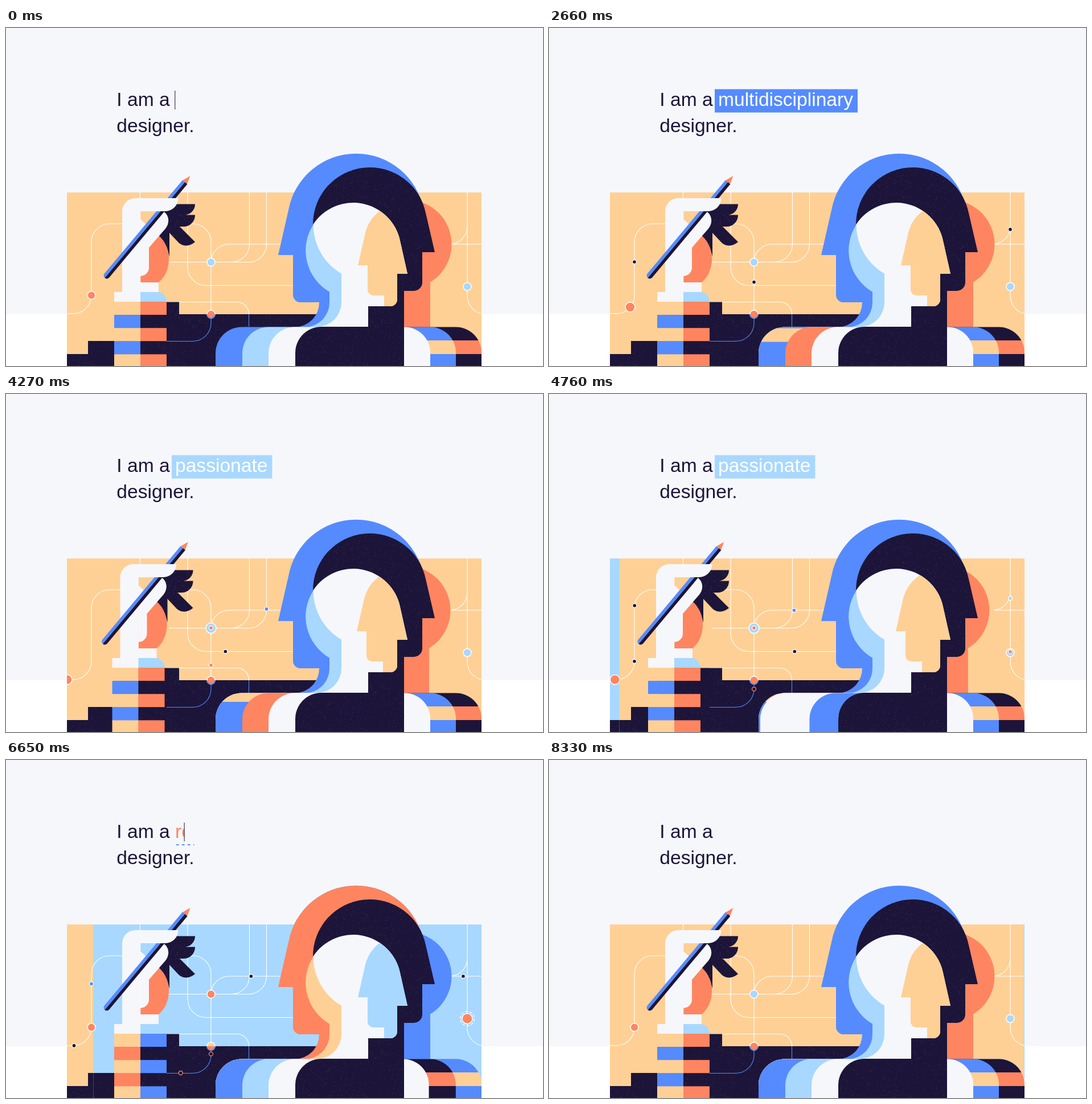
Write an HTML page that moves like this. It is 943 by 594 pixels and loops after 8.4 s.

```html
<!DOCTYPE html>
<html lang="en">
<head>
<meta charset="utf-8">
<title>I am a designer</title>
<style>
html, body { margin: 0; width: 100%; height: 100%; overflow: hidden; background: #f6f7fb; }
svg { display: block; width: 943px; height: 594px; }
text { font: 33.6px "Liberation Sans", Arial, sans-serif; white-space: pre; }
</style>
</head>
<body>
<svg id="stage" viewBox="0 0 943 594"></svg>
<script>
const LOOP = 8400;
const BLUE = '#558bff', SKY = '#a8d8ff', ORANGE = '#ff8560', PEACH = '#ffd095', NAVY = '#1c1539', PALE = '#f6f7fb';
const GRAIN = 'url(#grain)';
const WORD_X = 297;

const clamp = v => Math.max(0, Math.min(1, v));
const linear = v => v;
const smooth = v => v * v * (3 - 2 * v);
const cubicOut = v => 1 - (1 - v) ** 3;
const ramp = (t, start, length, ease = cubicOut) => ease(clamp((t - start) / length));

// Value at time t along [[time, value], ...]
function keyed(t, keys, ease = linear) {
  if (t <= keys[0][0]) return keys[0][1];
  for (let i = 1; i < keys.length; i++) {
    const [t0, v0] = keys[i - 1], [t1, v1] = keys[i];
    if (t <= t1) return v0 + (v1 - v0) * ease((t - t0) / (t1 - t0));
  }
  return keys[keys.length - 1][1];
}

const path = (d, fill, extra = '') => `<path d="${d}" fill="${fill}" ${extra}/>`;
const rect = (x, y, w, h, fill, extra = '') => `<rect x="${x}" y="${y}" width="${w}" height="${h}" fill="${fill}" ${extra}/>`;
const node = (x, y, fill, extra = '') =>
  `<circle cx="${x}" cy="${y}" r="7" fill="${fill}" stroke="#fff" stroke-width="1.5" ${extra}/>`;

function grainPattern(size, count) {
  let seed = 7, specks = '';
  const random = () => (seed = seed * 16807 % 2147483647) / 2147483647;
  for (let i = 0; i < count; i++) {
    specks += rect((random() * size).toFixed(1), (random() * size).toFixed(1), .8, .8, '#8a83a0', `opacity="${(.2 + random() * .4).toFixed(2)}"`);
  }
  return `<pattern id="grain" width="${size}" height="${size}" patternUnits="userSpaceOnUse">${rect(0, 0, size, size, NAVY)}${specks}</pattern>`;
}

const stripes = (id, base, row) =>
  `<pattern id="${id}" width="943" height="594" patternUnits="userSpaceOnUse">${rect(0, 0, 943, 594, base)}${rect(0, 549, 943, 24, row, `id="${id}Row"`)}</pattern>`;

const tracks = {
  left: 'M204 344H182A32 32 0 0 0 150 376V470A32 32 0 0 1 118 502H107',
  middle: 'M482 380H392A32 31 0 0 0 360 411V518A32 32 0 0 1 328 550H282',
  drop: 'M457.5 289V380H392A32 31 0 0 0 360 411',
  low: 'M282 481.5H405A21 21 0 0 1 426.500 502V525',
  cross: 'M319 289V420A32 32 0 0 0 351 452.500H505',
  right: 'M810 289V470A32 32 0 0 0 835 502',
  turn: 'M810 289V380H835',
  side: 'M835 380H782'
};

const lines = [
  tracks.left, tracks.cross, tracks.low, tracks.right, tracks.side,
  'M235.500 289V300', 'M286 344H328A32 32 0 0 1 360 376V503', 'M286 411.500H395',
  'M427.500 289V380A32 31.500 0 0 1 395 411.500', 'M457.500 289V380A32 31.500 0 0 1 426 411.500H395',
  'M482 380H392A32 31 0 0 0 360 411', 'M810 289V348A30 31 0 0 1 782 379.500'
].join('');

const HEAD = 'M539.500 345A84 84 0 0 1 692 374L705 432H687V477A12 12 0 0 1 675 489H636V525H546A43 43 0 0 0 589 482V431.600A100 100 0 0 1 539.500 345Z';

function woman(c) {
  const sleeves = [0, 1, 2, 3, 4].map(i => {
    const y = 481 + i * 23.1, odd = i % 2;
    return rect(190, y, 46.3, 23.6, odd ? c.hair : PEACH) + rect(236, y, 46, 23.6, odd ? GRAIN : c.back);
  }).join('');
  return `<g class="woman">
    ${path('M286 309.500H332A19 19 0 0 1 315 328.500H332A20 20 0 0 1 312 349H305L332 376C322 385 309 384 302 376L287 360V402C284 386 276 373 268 366L276 322Z', GRAIN)}
    ${path('M236 447H268C280 437 286 422 286 405C286 386 277 371 264 361L236 400Z', ORANGE)}
    ${path('M236 336L247 346L272 322H276C283 326 286 334 285 341C284 348 280 353 277 356L251 386V421A15 15 0 0 1 236 436Z', PALE)}
    ${path('M204 464V322H236.300V447H268V464H236.300V481.300H190V464Z', PALE)}
    ${path('M236 464H266A16 16 0 0 1 282 480V481.300H236Z', SKY)}
    ${sleeves}
    <g transform="translate(177 435) rotate(-50.1)">
      ${path('M214 -5.500H0A5.500 5.500 0 0 0 -5.500 0H214Z', BLUE)}
      ${path('M214 5.500H0A5.500 5.500 0 0 1 -5.500 0H214Z', NAVY)}
      ${path('M214 -5L228 0L214 5Z', ORANGE)}
    </g>
    ${path('M204 323V322A23 23 0 0 1 227 299H302.500A23 23 0 0 1 279.500 322H236V323Z', PALE)}
  </g>`;
}

function head(c) {
  return `<g class="face"><circle cx="704.5" cy="380" r="78" fill="${c.back}"/>${rect(685, 430, 60, 96, c.back)}</g>
    ${path('M478 399L496.500 318A120.500 120.500 0 0 1 733 318L700 420H600V525.500H507A43 43 0 0 0 550 482H517A13 13 0 0 1 504 469V399Z', c.hair)}
    ${path('M539 345A100 100 0 0 1 737 325L753 394H731V447A15 15 0 0 1 716 462H699V526H636V430Z', GRAIN)}
    ${path('M540 345A84 84 0 0 0 568 463.700V482A43 43 0 0 1 525 525.500H600V345Z', c.neck)}
    ${path(HEAD, PALE)}
    <g clip-path="url(#headClip)"><g class="face">
      ${path('M664 316C642 330 634 346 630 364L618 417H635V460A10 10 0 0 0 645 470H664V489H740V300Z', c.panel)}
    </g></g>`;
}

function scene(c) {
  return rect(107, 289, 728, 305, c.panel)
    + path(lines, 'none', 'stroke="#fff" stroke-width="1.1"')
    + path('M107 573H144V550H191V503H230V481.500H304V503H600V594H107Z', GRAIN)
    + path('M360 503V518A32 32 0 0 1 328 550.500H282M426.500 503V525', 'none', `stroke="${BLUE}" stroke-width="1.1"`)
    + node(360, 503, c.mark)
    + path('M353 503A7 7 0 0 0 367 503Z', ORANGE)
    + path('M353 503A7 7 0 0 0 367 503', 'none', `stroke="${BLUE}" stroke-width="1.5"`)
    + node(360, 411.5, c.hub, 'class="hub"') + node(810, 454.5, c.hub, 'class="beacon"')
    + woman(c) + head(c);
}

const warm = { panel: PEACH, hair: BLUE, neck: SKY, back: ORANGE, hub: SKY, mark: ORANGE };
const cool = { panel: SKY, hair: ORANGE, neck: PEACH, back: BLUE, hub: ORANGE, mark: PEACH };

// [start, fill, final edge]; later bands push over earlier ones
const PB = 'url(#peachBlue)', MOVING = 'url(#moving)', ON = 'url(#orangeNavy)';
const leftBands = [
  [-2000, BLUE, 368], [-2000, SKY, 415], [-2000, PALE, 461],
  [150, PALE, 368], [350, MOVING, 368], [550, ORANGE, 415], [650, PALE, 461],
  [4180, PALE, 368], [4650, BLUE, 368], [4960, SKY, 415], [5280, PALE, 461]
];
const rightBands = [
  [-2000, ON, 835], [-2000, PB, 790], [-2000, PALE, 745],
  [5136, PALE, 835], [5720, PB, 835], [5950, ON, 790], [6150, PALE, 745],
  [7050, PALE, 835], [7200, ON, 835], [7350, PB, 790], [7450, PALE, 745]
];

// [track, colour, [time, distance]...]
const travellers = [
  ['left', PEACH, [600, 30], [1470, 73], [1900, 95]],
  ['left', NAVY, [2000, 74], [3570, 153], [3850, 166]],
  ['left', NAVY, [4400, 32], [4760, 68], [5600, 153], [5730, 166]],
  ['left', NAVY, [4400, 166], [5800, 166], [6650, 215], [6850, 227]],
  ['left', BLUE, [6200, 40], [7200, 150]],
  ['middle', NAVY, [300, 66], [3850, 230]],
  ['middle', NAVY, [3050, 40], [4250, 139]],
  ['middle', ORANGE, [3500, 139], [4760, 247], [5600, 282], [6650, 318], [7400, 343]],
  ['middle', ORANGE, [4200, 139.5], [5000, 139.5]],
  ['middle', NAVY, [5000, 140], [5600, 216], [6650, 245], [7600, 300]],
  ['drop', PEACH, [500, 91], [2000, 91]],
  ['drop', BLUE, [2800, 0], [3570, 47], [4760, 118], [5200, 150]],
  ['drop', BLUE, [4900, 20], [5600, 91], [6000, 91]],
  ['drop', NAVY, [6100, 91], [6650, 118], [7300, 156]],
  ['low', NAVY, [600, 105], [1470, 139], [2200, 178]],
  ['cross', NAVY, [4100, 200], [4760, 262], [5400, 325]],
  ['right', NAVY, [700, 20], [1470, 49], [3570, 77], [4200, 165]],
  ['right', ORANGE, [4400, 164], [5200, 164]],
  ['right', NAVY, [5000, 30], [5600, 115], [5900, 165]],
  ['turn', SKY, [4300, 30], [4760, 70], [5600, 102], [5800, 116]],
  ['side', NAVY, [6300, 0], [6650, 32], [6900, 53]]
];

const words = [
  { text: 'multidisciplinary', color: BLUE, type: [1418, 340], select: 1780, end: 2870 },
  { text: 'passionate', color: SKY, type: [3355, 405], select: 4100, end: 5330 },
  { text: 'resourceful', color: ORANGE, type: [5402, 415], erase: [6440, 234], end: 6674 },
  { text: 'creative', color: BLUE, type: [6800, 300], select: 7180, end: 8290 }
];

const stage = document.getElementById('stage');
stage.innerHTML = `<defs>
    ${grainPattern(160, 520)}
    ${stripes('peachBlue', BLUE, PEACH)}${stripes('moving', BLUE, PEACH)}${stripes('orangeNavy', NAVY, ORANGE)}
    <clipPath id="headClip"><path d="${HEAD}"/></clipPath>
    <clipPath id="panelClip"><rect x="107" y="289" width="728" height="305"/></clipPath>
    <clipPath id="coolClip"><rect id="coolArea" y="0" height="594"/></clipPath>
    <clipPath id="wordClip"><rect id="wordArea" x="290" y="100" height="50"/></clipPath>
  </defs>
  ${rect(0, 0, 943, 594, PALE)}${rect(0, 503, 943, 91, '#fff')}
  <g>${scene(warm)}</g>
  <g clip-path="url(#coolClip)">${scene(cool)}</g>
  <g clip-path="url(#panelClip)">
    ${node(150, 470, ORANGE, 'id="roamer"')}
    <circle id="halo" cx="810" cy="454.5" r="12.5" fill="none" stroke="#fff" stroke-width="1.3" stroke-dasharray="5 2.8"/>
    <g id="dots"></g>
  </g>
  <g id="shoulders"></g>
  ${path('M508 594V571A46 46 0 0 1 554 525H699V594Z', GRAIN)}
  <text x="194.3" y="137.3" fill="${NAVY}">I am a</text>
  <text x="194.3" y="183" fill="${NAVY}">designer.</text>
  <rect id="selection" x="291" y="107.500" height="41"/>
  <g clip-path="url(#wordClip)"><text id="word" x="${WORD_X}" y="137.300"></text></g>
  <line id="dashes" x1="299" y1="149" y2="149" stroke="${BLUE}" stroke-width="2" stroke-dasharray="4.5 5.500"/>
  <rect id="cursor" y="110" width="1" height="33" fill="${NAVY}"/>`;

const byId = id => document.getElementById(id);
const set = (el, attrs) => { for (const k in attrs) el.setAttribute(k, attrs[k]); };
const show = (el, on) => el.setAttribute('visibility', on ? 'visible' : 'hidden');
const each = (selector, attrs) => stage.querySelectorAll(selector).forEach(el => set(el, attrs));

function makeShape(parent, tag, attrs) {
  const el = document.createElementNS('http://www.w3.org/2000/svg', tag);
  set(el, attrs);
  return parent.appendChild(el);
}

const trackPaths = {};
for (const name in tracks) trackPaths[name] = makeShape(stage.querySelector('defs'), 'path', { d: tracks[name] });
const dots = travellers.map(([track, color, ...keys]) =>
  ({ track: trackPaths[track], color, keys, el: makeShape(byId('dots'), 'circle', { r: 3.5, 'stroke-width': 1.3 }) }));

const addBand = ([start, fill, edge], side) => ({ start, edge, side, el: makeShape(byId('shoulders'), 'path', { fill }) });
const bands = [];
let sliver;
leftBands.forEach(band => {
  bands.push(addBand(band, -1));
  if (band[1] === ORANGE) sliver = makeShape(byId('shoulders'), 'rect', { x: 415, y: 573, height: 21, fill: NAVY });
});
rightBands.forEach(band => bands.push(addBand(band, 1)));

words.forEach(w => {
  byId('word').textContent = w.text;
  w.width = byId('word').getComputedTextLength();
});

function drawShoulders(t) {
  for (const { start, edge, side, el } of bands) {
    const origin = side < 0 ? 508 : 699;
    const x = origin + (edge - origin) * ramp(t, start, 800);
    set(el, {
      d: side < 0
        ? `M${x} 594V571.500A46 46 0 0 1 ${x + 46} 525.500H560V594Z`
        : `M600 525.500H${x - 45}A45 45 0 0 1 ${x} 570.500V594H600Z`
    });
  }
  set(sliver, { width: 47 * (1 - ramp(t, 1100, 420, linear)) });
  show(sliver, t > 1000 && t < 1520);
  set(byId('movingRow'), { y: keyed(t, [[1800, 549], [3200, 517]], smooth) });
}

function drawDots(t) {
  for (const { track, color, keys, el } of dots) {
    const alive = t >= keys[0][0] && t <= keys[keys.length - 1][0];
    show(el, alive);
    if (!alive) continue;
    const p = track.getPointAtLength(keyed(t, keys));
    const sunk = p.y > 505 && p.x > 280 && p.x < 430;
    set(el, { cx: p.x, cy: p.y, fill: sunk ? NAVY : color, stroke: sunk ? ORANGE : '#fff' });
  }
  const away = keyed(t, [[2000, 0], [3600, 61], [4450, 61], [5800, 0]], smooth);
  const p = trackPaths.left.getPointAtLength(166 + away);
  set(byId('roamer'), { cx: p.x, cy: p.y, r: keyed(t, [[2000, 7], [2600, 8.5], [5700, 8.5], [6000, 7]]) });
  each('.hub', { r: keyed(t, [[3300, 7], [3500, 9], [4900, 9], [5200, 7]]) });
  each('.beacon', { r: keyed(t, [[6400, 7], [6600, 9], [7000, 9], [7200, 7]]) });
  show(byId('halo'), t > 6450 && t < 7200);
}

function typedWidth(word, t) {
  const erased = word.erase ? ramp(t, ...word.erase, linear) : 0;
  return word.width * ramp(t, ...word.type, linear) * (1 - erased);
}

function drawText(t) {
  const word = words.find(w => t >= w.type[0] && t < w.end);
  const width = word ? typedWidth(word, t) : 0;
  const selected = !!word && t >= word.select;
  if (word) {
    byId('word').textContent = word.text;
    set(byId('word'), { fill: selected ? '#fff' : word.color });
    set(byId('selection'), { width: word.width + 14, fill: word.color });
  }
  set(byId('wordArea'), { width: WORD_X - 290 + width + (selected ? 9 : 0) });
  show(byId('word'), word);
  show(byId('selection'), selected);
  set(byId('cursor'), { x: WORD_X - .7 + width });
  show(byId('cursor'), !selected && (word || t % 1060 < 530));

  const underline = typedWidth(words[2], t - (t < 6000 ? 55 : 24));
  set(byId('dashes'), { x2: WORD_X + underline });
  show(byId('dashes'), underline > 2);
}

function draw(t) {
  const shift = keyed(t, [[2700, 0], [3400, 18], [3800, 18], [4600, -16], [4800, -16], [5450, 0]], smooth);
  each('.woman', { transform: `translate(${shift} 0)` });
  each('.face', { transform: `translate(${shift * .57} 0)` });

  const coolEnd = 107 + 728 * ramp(t, 4749, 1570);
  const coolStart = 107 + 728 * ramp(t, 6609, 1930);
  set(byId('coolArea'), { x: coolStart, width: Math.max(0, coolEnd - coolStart) });

  drawShoulders(t);
  drawDots(t);
  drawText(t);
}

const began = performance.now();
function tick() {
  draw((performance.now() - began) % LOOP);
  requestAnimationFrame(tick);
}
tick();
</script>
</body>
</html>
```
